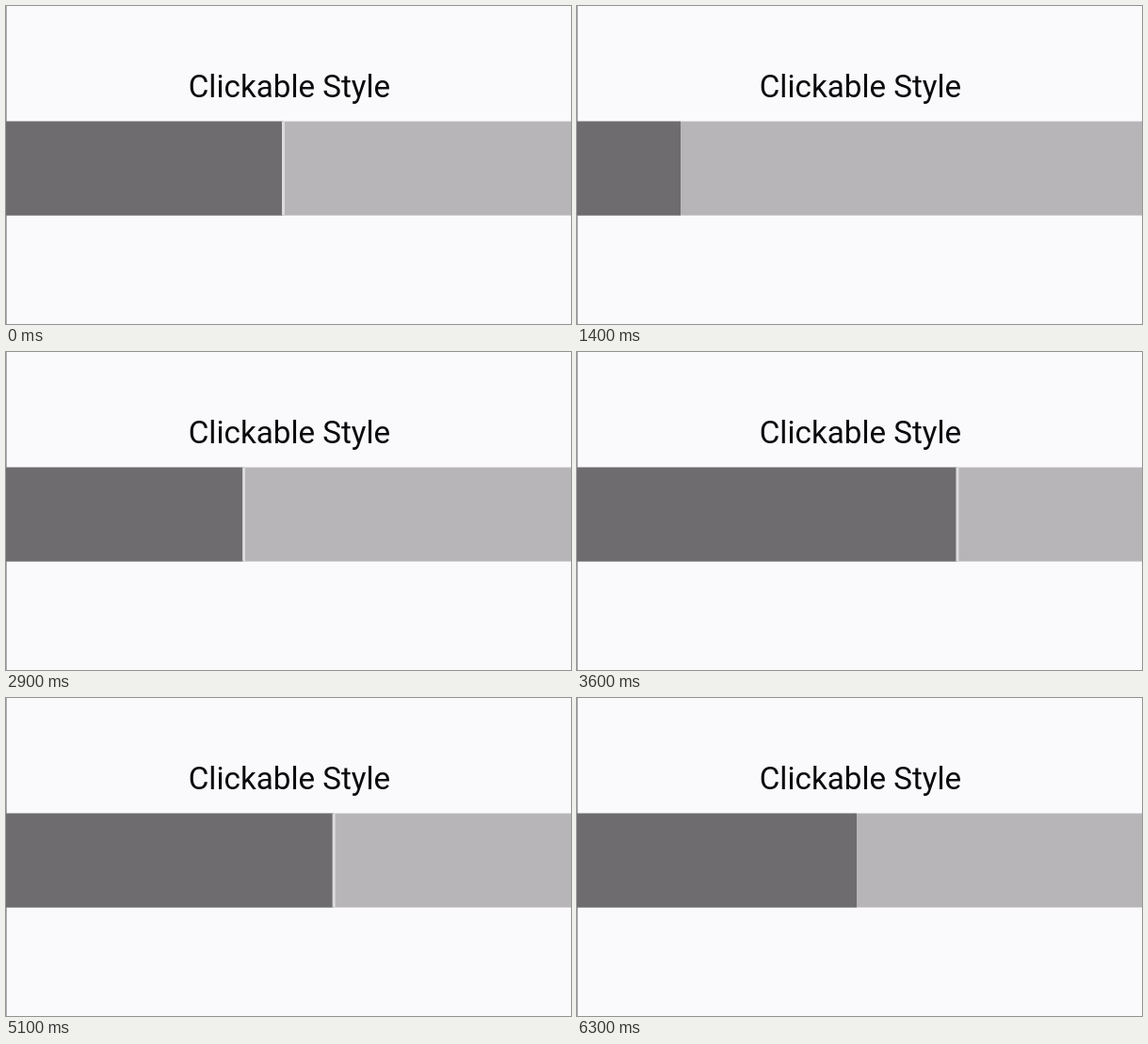
Write an HTML page that moves like this. It is 600 px wide and 338 px high and loops after 7100 ms.

```html
<!DOCTYPE html>
<html lang="en">
<head>
<meta charset="utf-8">
<title>Clickable Style</title>
<style>
  html, body { margin: 0; width: 100%; height: 100%; overflow: hidden; background: #faf9fb; }
  svg { display: block; width: 100vw; height: 100vh; }
  text { font: 33.2px Roboto, sans-serif; fill: #0b0a0c; text-anchor: middle; }
</style>
</head>
<body>
<svg viewBox="0 0 600 338">
  <rect width="600" height="338" fill="#faf9fb"/>
  <rect width="0.8" height="338" fill="#99979b"/>
  <text x="301" y="97">Clickable Style</text>
  <rect y="122.6" width="600" height="100" fill="#b7b5b8"/>
  <rect id="pane" y="122.6" height="100" fill="#6e6c6f"/>
  <rect id="handle" y="122.6" width="3" height="100" fill="#dcdbdd"/>
</svg>
<script>
const LOOP = 7100, STEP = 100;
const pane = document.getElementById('pane');
const handle = document.getElementById('handle');

// The handle shows only during a drag; afterwards the divider settles at rest.
const drags = [
  { start: 0, end: 1400, from: 294.5, to: 110 },
  { start: 2200, end: 4000, from: 110, to: 430, skew: 0.81 },
  { start: 4700, end: 5600, from: 430, to: 256.5 },
  { start: 5600, end: 6300, from: 256.5, to: 302, rest: 297 }
];

// Cosine ease; a skew below 1 shortens the acceleration.
const ease = (u, skew) => (1 - Math.cos(Math.PI * u ** skew)) / 2;

function draw(now) {
  const time = Math.floor(now % LOOP / STEP) * STEP;
  const { start, end, from, to, rest = to, skew = 0.9 } = drags.findLast(drag => drag.start <= time);
  const dragging = time < end;
  const x = dragging ? from + (to - from) * ease((time - start) / (end - start), skew) : rest;
  pane.setAttribute('width', x);
  handle.setAttribute('x', x - 1.5);
  handle.setAttribute('visibility', dragging ? 'visible' : 'hidden');
}

const origin = performance.now();
function tick() {
  draw(performance.now() - origin);
  requestAnimationFrame(tick);
}
tick();
</script>
</body>
</html>
```
